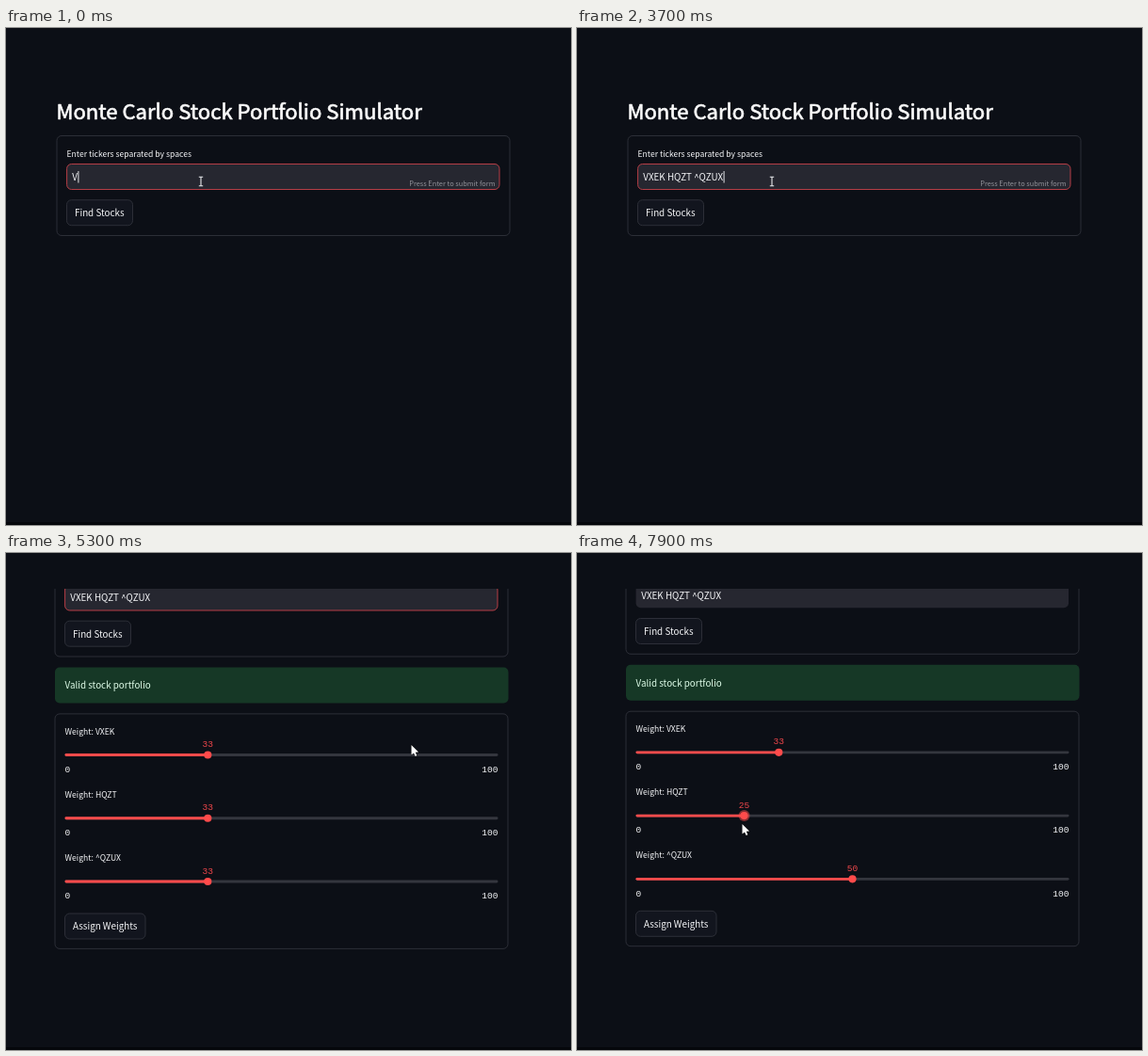
Write an HTML page with a canvas that moves like this. It is 600 by 528 pixels and loops after 8000 ms.

```html
<!DOCTYPE html>
<html lang="en">
<head>
<meta charset="utf-8">
<title>Portfolio simulator</title>
<style>
  html, body { margin: 0; width: 100%; height: 100%; overflow: hidden; background: #0c0f16; }
  canvas { display: block; width: 600px; height: 528px; }
</style>
</head>
<body>
<canvas id="stage"></canvas>
<script>
const W = 600, H = 528, LOOP = 8000, STEP = 100;
const SANS = '"Noto Sans CJK JP", "Noto Sans CJK SC", "Noto Sans CJK", "Noto Sans", sans-serif';
const MONO = '"Liberation Mono", "DejaVu Sans Mono", monospace';
const BG = '#0c0f16', LINE = '#30333b', RED = '#ff4b4b', WHITE = '#f6f7f9';

const TICKERS = ['VXEK', 'HQZT', '^QZUX'];
const ENTRY = TICKERS.join(' ');
const KEYS = [0, 300, 500, 800, 1100, 1500, 1800, 2100, 2300, 2500, 2800, 3000, 3200, 3400, 3600];
const RESULT_AT = 4300, HINT_OFF = 4200, BLUR_AT = 6100, FOCUS_2 = 7400;

// [time, value...] points
const SCROLL = [[4800, 0], [5300, 110.5], [5500, 113.2]];
const POINTER = [
  [4100, 207, 163], [4600, 233.5, 171], [4700, 233.5, 171], [5100, 430.5, 204],
  [5400, 430.5, 204], [5900, 214, 347], [6100, 214, 347], [6400, 234, 347.5],
  [7000, 293, 347.5], [7100, 293, 347.5], [7400, 214, 280], [7500, 206, 280],
  [7700, 177, 280], [7800, 175.5, 284], [7900, 175.5, 288]
];
const WEIGHT_2 = [[7400, 33], [7700, 25]];
const WEIGHT_3 = [[6100, 33], [6400, 35], [7000, 50]];

const canvas = document.getElementById('stage');
const ctx = canvas.getContext('2d');
const ratio = window.devicePixelRatio || 1;
canvas.width = W * ratio;
canvas.height = H * ratio;

function track(points, t, i = 1) {
  if (t <= points[0][0]) return points[0][i];
  for (let k = 1; k < points.length; k++) {
    const a = points[k - 1], b = points[k];
    if (t <= b[0]) {
      const u = (t - a[0]) / (b[0] - a[0]);
      return a[i] + (b[i] - a[i]) * u;
    }
  }
  return points[points.length - 1][i];
}

function box(x, y, w, h, r, fill, stroke) {
  ctx.beginPath();
  ctx.roundRect(x, y, w, h, r);
  if (fill) { ctx.fillStyle = fill; ctx.fill(); }
  if (stroke) { ctx.strokeStyle = stroke; ctx.lineWidth = 0.9; ctx.stroke(); }
}

function text(str, x, y, size, color = WHITE, align = 'left', family = SANS) {
  ctx.font = size + 'px ' + family;
  ctx.textAlign = align;
  ctx.fillStyle = color;
  ctx.fillText(str, x, y);
}

function dot(x, y, r, color) {
  ctx.fillStyle = color;
  ctx.beginPath();
  ctx.arc(x, y, r, 0, Math.PI * 2);
  ctx.fill();
}

function button(label, x, y, w) {
  box(x, y, w, 27, 5, '#12151e', LINE);
  text(label, x + 8.5, y + 17.4, 9.84);
}

function title() {
  const str = 'Monte Carlo Stock Portfolio Simulator';
  text(str, 53.5, 97.4, 22.1, '#fafafa');
  ctx.strokeStyle = '#fafafa';
  ctx.lineWidth = 0.7;
  ctx.lineJoin = 'round';
  ctx.strokeText(str, 53.5, 97.4);
}

function searchForm(t) {
  const focused = t < BLUR_AT;
  box(54, 114.5, 481, 106, 5, null, LINE);
  text('Enter tickers separated by spaces', 64.5, 136.6, 8.61);
  box(64.6, 144.5, 459.4, 27, 5, '#262730', focused ? '#c8424a' : null);
  const typed = ENTRY.slice(0, KEYS.filter(k => k <= t).length);
  text(typed, 70.3, 161.7, 9.84);
  if (t < 4800) {
    const end = 70.8 + ctx.measureText(typed).width;
    ctx.fillStyle = WHITE;
    ctx.fillRect(end, 152, 0.9, 12.5);
  }
  if (t < HINT_OFF) text('Press Enter to submit form', 519.5, 168, 7.38, '#92939a', 'right');
  button('Find Stocks', 64.5, 182.7, 70);
}

function slider(name, value, y, focused) {
  const left = 64.5, width = 460, x = left + width * value / 100;
  text('Weight: ' + name, left, y - 21.9, 8.61);
  text(value, x, y - 8.4, 9.56, '#f0474b', 'center', MONO);
  box(left, y - 1.4, width, 2.8, 1.4, '#34363e');
  box(left, y - 1.4, x - left, 2.8, 1.4, RED);
  if (focused) dot(x, y, 6, 'rgba(255,75,75,0.5)');
  dot(x, y, 4.1, RED);
  text('0', left, y + 18.4, 9.56, WHITE, 'left', MONO);
  text('100', left + width, y + 18.4, 9.56, WHITE, 'right', MONO);
}

function results(t) {
  box(54, 232, 481.5, 38, 5, '#163826');
  text('Valid stock portfolio', 64.5, 254.8, 9.84, '#dffde9');
  box(54, 281.4, 481, 249.5, 5, null, LINE);
  const values = [33, Math.round(track(WEIGHT_2, t)), Math.round(track(WEIGHT_3, t))];
  const active = t >= FOCUS_2 ? 1 : t >= BLUR_AT ? 2 : -1;
  TICKERS.forEach((name, i) => slider(name, values[i], 325 + 67.25 * i, i === active));
  button('Assign Weights', 64.5, 493.5, 85.5);
}

function beam(x, y) {
  ctx.strokeStyle = '#e8e9ec';
  ctx.lineWidth = 1.1;
  ctx.beginPath();
  ctx.moveTo(x, y - 4.5);
  ctx.lineTo(x, y + 4.5);
  for (const dy of [-4.8, 4.8]) {
    ctx.moveTo(x - 2.2, y + dy);
    ctx.lineTo(x + 2.2, y + dy);
  }
  ctx.stroke();
}

function arrow(x, y) {
  ctx.beginPath();
  [[0, 0], [0, 10.6], [2.5, 8.4], [4.1, 12], [5.9, 11.2], [4.3, 7.7], [7.6, 7.5]]
    .forEach(([dx, dy]) => ctx.lineTo(x + dx, y + dy));
  ctx.closePath();
  ctx.strokeStyle = '#000';
  ctx.lineWidth = 0.8;
  ctx.stroke();
  ctx.fillStyle = '#fff';
  ctx.fill();
}

function fist(x, y) {
  ctx.fillStyle = '#fff';
  for (let i = 0; i < 4; i++) {
    ctx.beginPath();
    ctx.roundRect(x - 3.2 + i * 1.8, y - (i === 0 || i === 3 ? 3.4 : 4.1), 1.9, 5, 0.9);
    ctx.fill();
  }
  box(x - 4.2, y - 1, 2.4, 3.2, 1.1, '#fff');
  box(x - 3, y - 1.5, 7, 5.6, 2, '#fff');
}

function pointer(t) {
  const x = track(POINTER, t, 1), y = track(POINTER, t, 2);
  const dragging = (t >= 6100 && t <= 7000) || (t >= 7400 && t < 7700);
  if (t <= 4700) beam(x, y);
  else if (dragging) fist(x, y);
  else arrow(x, y);
}

function draw(t) {
  ctx.setTransform(ratio, 0, 0, ratio, 0, 0);
  ctx.fillStyle = BG;
  ctx.fillRect(0, 0, W, H);

  ctx.save();
  ctx.beginPath();
  ctx.rect(0, 38, W, 487);
  ctx.clip();
  // the page narrows once a scrollbar is needed
  ctx.translate(t >= RESULT_AT ? -2 : 0, -track(SCROLL, t));
  title();
  searchForm(t);
  if (t >= RESULT_AT) results(t);
  ctx.restore();

  ctx.fillStyle = '#05070b';
  ctx.fillRect(0, 525, W, 3);
  pointer(t);
}

function tick() {
  const t = performance.now() % LOOP;
  draw(Math.floor(t / STEP) * STEP);
  requestAnimationFrame(tick);
}
tick();
</script>
</body>
</html>
```
